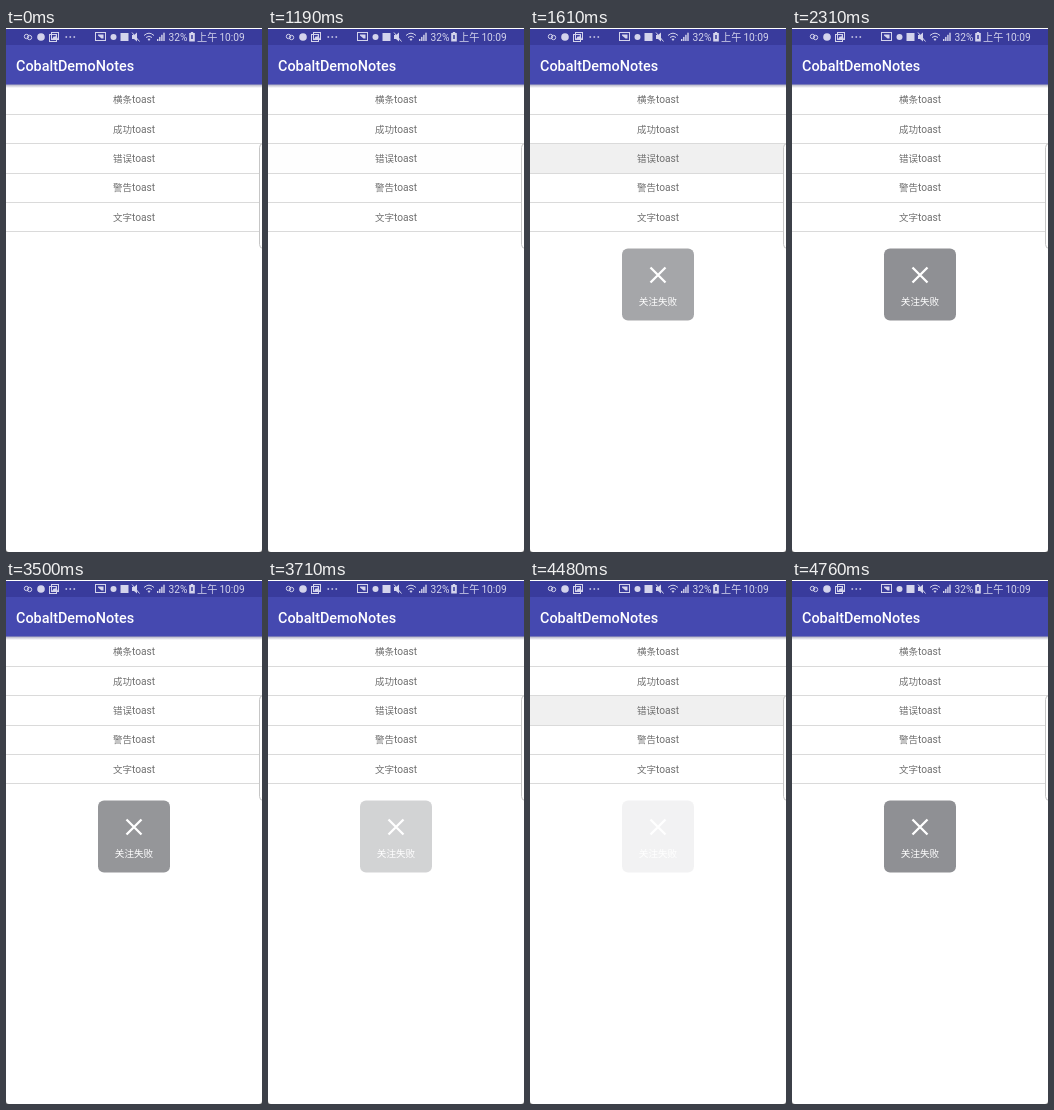
These frames come from a looping animation (256 by 524 pixels, 5.81 s). An HTML page:

```html
<!DOCTYPE html>
<html lang="zh">
<head>
<meta charset="utf-8">
<title>Toast demo</title>
<style>
  html, body { margin: 0; width: 100%; height: 100%; overflow: hidden; background: #fff; }
  svg { display: block; width: 256px; height: 524px; }
  text { font-family: Roboto, "Noto Sans CJK SC", "Noto Sans CJK", sans-serif; }
  .status { fill: #d4d4ec; }
  .status text { font-size: 10.2px; }
  .title { font-size: 14.4px; font-weight: 500; fill: #fff; }
  .rows text { font-size: 9.5px; fill: #707070; text-anchor: middle; }
  .rows tspan { font-size: 10.2px; }
  .rows path { stroke: #dadada; }
  .line { fill: none; stroke: #d4d4ec; }
  #toast text { font-size: 9.6px; fill: #fff; text-anchor: middle; }
  #press, #toast { opacity: 0; }
</style>
</head>
<body>
<svg viewBox="0 0 256 524">
  <defs>
    <linearGradient id="shade" x2="0" y2="1">
      <stop stop-color="#a4a4b8"/>
      <stop offset="1" stop-color="#fff"/>
    </linearGradient>
  </defs>
  <rect width="256" height="524" fill="#fff"/>
  <rect id="press" y="116" width="254" height="29" fill="#f0f0f0"/>
  <g class="rows" id="rows"></g>
  <rect x="253.5" y="115.5" width="20" height="105" rx="4" fill="#fff" stroke="#c6c6c6"/>

  <rect y="56" width="256" height="4" fill="url(#shade)"/>
  <rect y="1" width="256" height="55.5" fill="#4549b0"/>
  <rect y="1" width="256" height="16" fill="#393b9c"/>
  <text class="title" x="10" y="43">CobaltDemoNotes</text>

  <g class="status">
    <!-- weather, app, picture, more -->
    <circle class="line" cx="20.5" cy="8.5" r="2.2"/>
    <circle class="line" cx="23.5" cy="9.5" r="2.2"/>
    <circle cx="35" cy="9" r="3.8"/>
    <rect class="line" x="43.5" y="6.5" width="7" height="7"/>
    <rect class="line" x="45.5" y="4.5" width="7" height="7"/>
    <path d="M46 11l2-3 1 1 1-2 2 4z"/>
    <path class="line" d="M59.5 9H70" stroke-width="1.6" stroke-dasharray="1.6 2.4"/>
    <!-- cast, two radios, mute -->
    <rect class="line" x="89.5" y="4.5" width="10" height="8"/>
    <path d="M92 6.5h5.5v4h-2L92 7.5z"/>
    <circle cx="107.5" cy="9" r="3"/>
    <rect x="114.5" y="5" width="8" height="8"/>
    <path d="M126 7h2l3-2.5v9L128 11h-2z"/>
    <path class="line" d="M126 4.5l7.5 9"/>
    <!-- wifi, signal, battery -->
    <path class="line" d="M138 7.5q5-4.6 10 0M140 9.5q3-2.7 6 0"/>
    <path d="M141.5 11q1.5-1.2 3 0L143 13z"/>
    <g id="bars"></g>
    <text x="162.6" y="13">32%</text>
    <rect x="183.2" y="5" width="5.6" height="8.5"/>
    <rect x="184.8" y="4" width="2.4" height="2"/>
    <path d="M186 7v4" stroke="#393b9c" stroke-width="1.5"/>
    <text x="191" y="13">上午</text>
    <text x="213.4" y="13">10:09</text>
  </g>

  <g id="toast">
    <rect x="92" y="220.5" width="72" height="72" rx="6" fill="#8f9094"/>
    <path d="M120.5 239.5l15 15m0-15l-15 15" stroke="#fff" stroke-width="2.3"/>
    <text x="128" y="276.6">关注失败</text>
  </g>
  <path d="M0 521q0 3 3 3H0zM256 521q0 3-3 3h3z" fill="#666"/>
</svg>
<script>
  const LOOP = 5810, TICK = 70;
  const byId = id => document.getElementById(id);

  byId("rows").innerHTML = ["横条", "成功", "错误", "警告", "文字"].map((word, i) => {
    const top = 57.2 + 29.33 * i;
    const line = Math.floor(top + 29.33) + 0.5;
    return `<text x="128" y="${top + 18.2}">${word}<tspan>toast</tspan></text><path d="M0 ${line}H256"/>`;
  }).join("");

  byId("bars").innerHTML = [0, 1, 2, 3].map(i =>
    `<rect x="${151 + 2.1 * i}" y="${11 - 2.1 * i}" width="1.4" height="${2 + 2.1 * i}"/>`
  ).join("");

  // Smooth rise from 0 to 1 between two times.
  function ramp(ms, from, to) {
    const t = Math.min(1, Math.max(0, (ms - from) / (to - from)));
    return t * t * (3 - 2 * t);
  }

  const pressAt = ms =>
    ramp(ms, 1150, 1400) - ramp(ms, 1610, 1820) + ramp(ms, 4130, 4270) - ramp(ms, 4480, 4760);
  const toastAt = ms =>
    ramp(ms, 1190, 1780) - ramp(ms, 3430, 3920) + ramp(ms, 4410, 4760);

  const start = performance.now();
  function draw() {
    const elapsed = (performance.now() - start) % LOOP;
    const ms = Math.floor(elapsed / TICK) * TICK;
    byId("press").style.opacity = pressAt(ms);
    byId("toast").style.opacity = toastAt(ms);
    requestAnimationFrame(draw);
  }
  draw();
</script>
</body>
</html>
```
